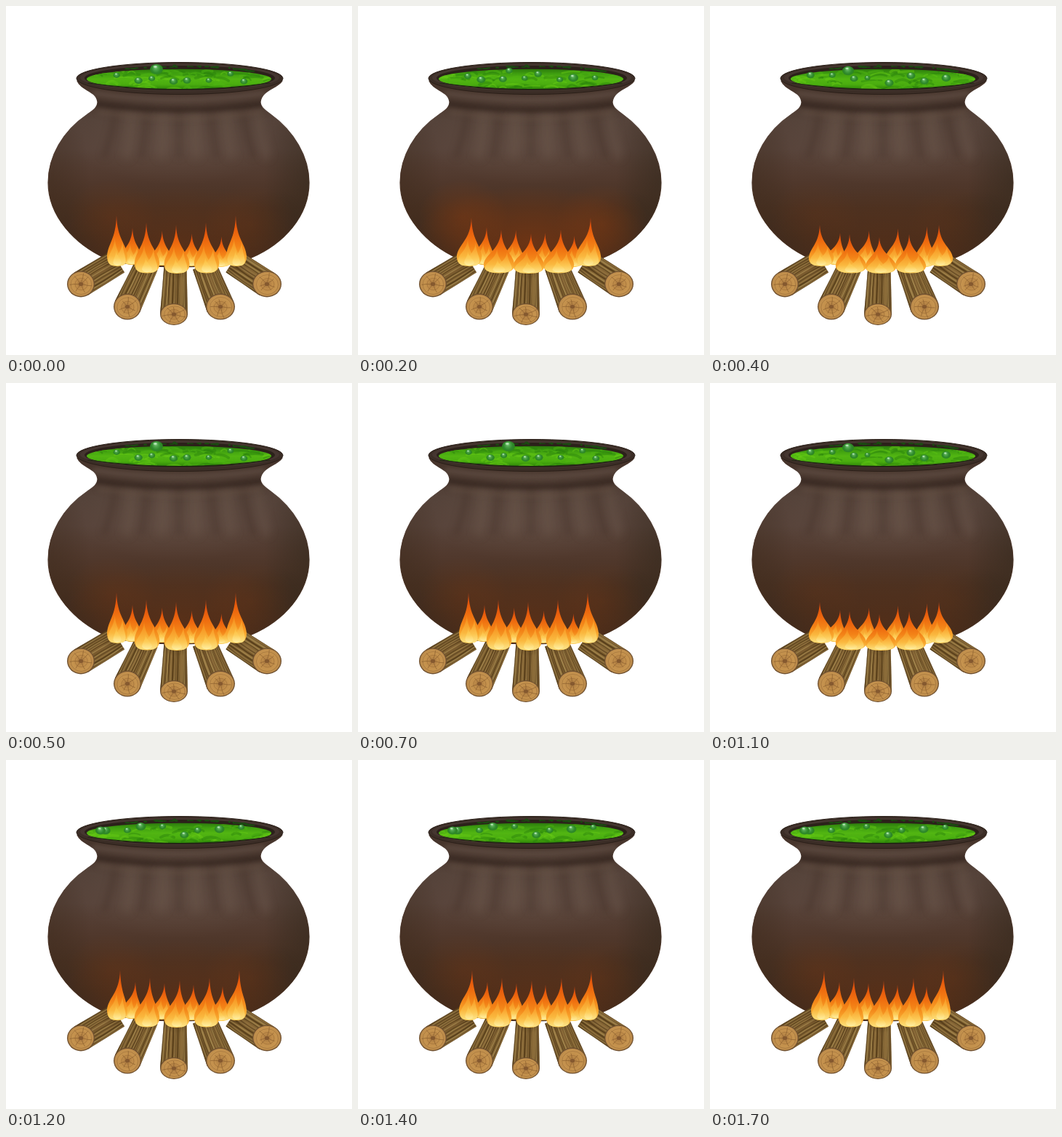
These frames come from a looping animation (476 by 480 pixels, 1.8 s). An HTML page with a canvas:

```html
<!DOCTYPE html>
<html lang="en">
<head>
<meta charset="utf-8">
<title>Cauldron</title>
<style>
html, body { margin: 0; width: 100%; height: 100%; overflow: hidden; background: #fff; }
canvas { display: block; width: 476px; height: 480px; }
</style>
</head>
<body>
<canvas id="stage" width="476" height="480"></canvas>
<script>
const W = 476, H = 480, TICK = 50, TAU = Math.PI * 2;
const stage = document.getElementById('stage').getContext('2d');

// Each pose is followed by the number of ticks it stays
const TIMELINE = 'A1C2D1B2A2C1D1A2B2A2C2D2A2C1D2A1C2D2A2C2D2'
  .replace(/(\w)(\d)/g, (_, pose, n) => pose.repeat(n));

// Front flames: height at the ends, dip in the middle, lean and width.
// Back flames: first height, step, lean. Then pot glow and largest bubble.
const POSES = {
  A: { top: 288, dip: 13, lean: -1, width: 35, backTop: 305, step: 4, backLean: 1, glow: 0.42, bubble: [207, 87, 9] },
  B: { top: 291, dip: 22, lean: 3, width: 43, backTop: 304, step: 4, backLean: 4, glow: 0.85, bubble: [208, 89, 5] },
  C: { top: 301, dip: 17, lean: -2, width: 43, backTop: 312, step: -3, backLean: 6, glow: 0.28, bubble: [190, 89, 8] },
  D: { top: 289, dip: 14, lean: 4, width: 35, backTop: 305, step: 2, backLean: 5, glow: 0.42, bubble: [130, 97, 7] }
};

function seeded(n) {
  return () => {
    n = (n * 16807) % 2147483647;
    return n / 2147483647;
  };
}

function ellipse(c, x, y, rx, ry, fill) {
  c.beginPath();
  c.ellipse(x, y, rx, ry, 0, 0, TAU);
  if (fill) { c.fillStyle = fill; c.fill(); }
}

function shade(gradient, ...colors) {
  colors.forEach((color, i) => gradient.addColorStop(i / (colors.length - 1), color));
  return gradient;
}

// Soft elliptical patch of colour
function patch(c, x, y, rx, ry, rgb, alpha) {
  c.save();
  c.translate(x, y);
  c.scale(rx, ry);
  const g = shade(c.createRadialGradient(0, 0, 0, 0, 0, 1),
    `rgba(${rgb},${alpha})`, `rgba(${rgb},${alpha * 0.55})`, `rgba(${rgb},0)`);
  ellipse(c, 0, 0, 1, 1, g);
  c.restore();
}

function curve(c, color, width, blur, x0, y0, cx, cy, x1, y1) {
  c.save();
  c.filter = blur ? `blur(${blur}px)` : 'none';
  c.strokeStyle = color;
  c.lineWidth = width;
  c.lineCap = 'round';
  c.beginPath();
  c.moveTo(x0, y0);
  c.quadraticCurveTo(cx, cy, x1, y1);
  c.stroke();
  c.restore();
}

function potPath(c) {
  c.beginPath();
  c.moveTo(98, 103);
  c.bezierCurveTo(104, 117, 124, 116, 126, 132);
  c.bezierCurveTo(126, 140, 119, 144, 112, 149);
  c.bezierCurveTo(78, 172, 58, 207, 58, 243);
  c.bezierCurveTo(58, 289, 95, 328, 137, 347);
  c.bezierCurveTo(172, 363, 304, 363, 338, 346);
  c.bezierCurveTo(382, 327, 417, 289, 417, 243);
  c.bezierCurveTo(417, 207, 396, 172, 364, 149);
  c.bezierCurveTo(357, 144, 350, 139, 350, 132);
  c.bezierCurveTo(352, 115, 373, 114, 380, 103);
  c.closePath();
}

function drawPot(c, glow) {
  c.save();
  potPath(c);
  c.fillStyle = c.strokeStyle = shade(c.createLinearGradient(0, 115, 0, 360),
    '#47352c', '#55433a', '#57433a', '#51392d', '#483021', '#432c1d', '#432a1a');
  c.lineWidth = 1.2;
  c.fill();
  c.stroke();
  c.clip();

  patch(c, 237, 185, 145, 60, '112,91,79', 0.36);
  patch(c, 60, 240, 55, 120, '60,42,28', 0.45);
  patch(c, 417, 240, 62, 130, '54,42,30', 0.65);
  patch(c, 115, 325, 80, 46, '58,42,30', 0.5);
  patch(c, 372, 310, 70, 56, '52,40,30', 0.5);

  // Folds fanning out from the neck
  for (let i = -2; i <= 2; i++) {
    const x = 238 + i * 44;
    curve(c, 'rgba(54,38,29,.26)', 9, 5, x, 146, x + i, 170, x + i * 7, 205);
    curve(c, 'rgba(125,105,93,.2)', 13, 6, x + 22, 152, x + 22, 175, x + 24 + i * 4, 205);
  }

  // Lip and shadowed neck
  curve(c, 'rgba(106,87,77,.6)', 6, 3, 122, 120, 238, 137, 354, 120);
  curve(c, 'rgba(43,30,23,.65)', 7, 3, 121, 134, 238, 151, 356, 134);
  curve(c, 'rgba(100,80,68,.45)', 6, 3, 128, 146, 238, 163, 350, 146);

  patch(c, 238, 325, 165, 78, '150,60,12', glow * 0.6);
  patch(c, 145, 290, 62, 52, '145,62,15', glow * 0.4);
  patch(c, 335, 300, 65, 55, '145,62,15', glow * 0.4);
  c.restore();
}

function drawRim(c) {
  ellipse(c, 239, 99.5, 142, 22, '#3b2d26');
  c.strokeStyle = '#2a1f18';
  c.lineWidth = 1;
  c.stroke();
  ellipse(c, 239, 98.5, 137, 18.5, '#453630');
  ellipse(c, 239, 99, 131, 17, '#2b211a');
  const rnd = seeded(71);
  for (let i = 0; i < 45; i++) {
    const a = Math.PI * (1.3 + rnd() * 0.5);
    ellipse(c, 239 + Math.cos(a) * 123, 99 + Math.sin(a) * (15 + rnd() * 2),
      1 + rnd() * 4, 0.6 + rnd(), '#1c4b12');
  }
}

function drawBubble(c, x, y, r) {
  ellipse(c, x, y, r, r * 0.78, shade(c.createRadialGradient(x - r * 0.15, y - r * 0.4, 0, x, y, r),
    '#9bd79b', '#4fa64c', '#2f8a2c', '#2c8220'));
  ellipse(c, x - r * 0.2, y - r * 0.4, r * 0.28, r * 0.14, 'rgba(224,255,225,.6)');
}

function drawBrew(c, bubble, seed) {
  const rnd = seeded(seed * 997);
  c.save();
  ellipse(c, 238, 100.5, 127, 13.8, shade(c.createLinearGradient(0, 86, 0, 115),
    '#2a760c', '#3f9f10', '#52b512', '#4aad0f', '#2c8308'));
  c.clip();
  const tones = ['rgba(105,205,22,.45)', 'rgba(36,122,12,.4)', 'rgba(78,182,18,.5)'];
  for (let i = 0; i < 75; i++) {
    const x = 108 + rnd() * 260, y = 88 + rnd() * 26, w = 4 + rnd() * 10;
    curve(c, tones[i % 3], 1.5 + rnd() * 2.5, 0, x - w, y + 2, x, y - 5 + rnd() * 5, x + w, y + rnd() * 4);
  }
  c.restore();
  curve(c, '#1d2912', 1.2, 0, 113, 106, 238, 123, 363, 106);

  for (let i = 0; i < 8; i++) {
    const x = 135 + ((i * 0.618 + seed * 0.23) % 1) * 205;
    drawBubble(c, x, 90 + rnd() * 16, 4 + rnd() * 3);
  }
  drawBubble(c, ...bubble);
}

// One log of the fan, i from -2 to 2
function drawLog(c, i) {
  const rnd = seeded(i * 311 + 1017), off = Math.abs(i);
  const x = 231 + i * 64, y = 424 - i * i * 10.4, rx = 19 + (i > 0), ry = off ? 18 : 15;
  const bx = 233 + i * 39.5, by = 358 - i * i * 1.6, half = 15.5 + off;
  const len = Math.hypot(bx - x, by - y), px = (y - by) / len, py = (bx - x) / len;
  const reach = 1 / Math.hypot(px / rx, py / ry);
  const at = (side, far) => far
    ? [bx + px * half * side, by + py * half * side]
    : [x + px * reach * side, y + py * reach * side];

  c.save();
  c.beginPath();
  [at(-1, 0), at(-1, 1), at(1, 1), at(1, 0)].forEach(p => c.lineTo(...p));
  c.closePath();
  c.fillStyle = shade(c.createLinearGradient(...at(-1, 0), ...at(1, 0)),
    '#5d4420', '#8b6c39', '#7a5a2e', '#8b6c39', '#5a4120');
  c.fill();
  c.clip();
  const barks = ['rgba(80,56,22,.75)', 'rgba(168,140,82,.7)', 'rgba(98,70,34,.7)', 'rgba(148,118,64,.7)'];
  for (let k = 0; k < 20; k++) {
    const side = -0.95 + k * 0.1, bend = (rnd() - 0.5) * 9;
    const [x0, y0] = at(side, 0), [x1, y1] = at(side, 1);
    curve(c, barks[k % 4], 1 + rnd() * 1.5, 0, x0, y0,
      (x0 + x1) / 2 + px * bend, (y0 + y1) / 2 + py * bend, x1, y1);
  }
  patch(c, bx, by, 25, 18, '60,38,12', 0.35);
  c.restore();

  ellipse(c, x, y, rx, ry, '#6f5030');
  ellipse(c, x, y, rx - 1.3, ry - 1.3, shade(
    c.createRadialGradient(x, y, 1, x, y, rx), '#a87840', '#c08d4a', '#c6944f', '#b58548'));
  c.lineWidth = 0.7;
  c.strokeStyle = 'rgba(125,82,40,.5)';
  for (const k of [0.45, 0.75]) {
    ellipse(c, x + rnd(), y + rnd(), rx * k, ry * k);
    c.stroke();
  }
  for (let k = 0; k < 7; k++) {
    const a = k * TAU / 7 + rnd() * 0.5, far = 0.5 + rnd() * 0.4;
    const ray = (t, turn) => [x + Math.cos(a + turn) * rx * t, y + Math.sin(a + turn) * ry * t];
    curve(c, 'rgba(118,78,38,.65)', 0.8, 0, ...ray(0.2, 0), ...ray(far * 0.7, 0.1), ...ray(far, 0));
  }
  ellipse(c, x, y, 3.2, 2.6, '#85592f');
}

function tongue(c, tx, ty, x, base, w, colors) {
  const h = base - ty, r = w / 2, mid = ty + h * 0.48;
  c.beginPath();
  c.moveTo(tx, ty);
  c.bezierCurveTo(tx + 1, mid, x + r * 0.9, mid + h * 0.06, x + r, base - h * 0.2);
  c.bezierCurveTo(x + r, base - 3, x + r * 0.6, base, x, base);
  c.bezierCurveTo(x - r * 0.6, base, x - r, base - 3, x - r, base - h * 0.2);
  c.bezierCurveTo(x - r * 0.9, mid + h * 0.06, tx - 1, mid, tx, ty);
  c.fillStyle = shade(c.createLinearGradient(0, ty, 0, base), ...colors);
  c.fill();
}

function drawFlame(c, tx, ty, x, base, w) {
  const h = base - ty, lean = tx - x;
  tongue(c, tx, ty, x, base, w, ['#cf4412', '#e4560c', '#ee6c0f', '#f38317', '#f8a52c', '#fccb55']);
  tongue(c, x + lean * 0.5 - w * 0.1, ty + h * 0.42, x - w * 0.14, base - 1, w * 0.62,
    ['rgba(250,150,30,.2)', '#f79d28', '#fab83f', '#fee07a']);
  tongue(c, x + w * 0.26, ty + h * 0.5, x + w * 0.17, base - 1, w * 0.5,
    ['rgba(255,170,46,.2)', '#f9a630', '#fcc651', '#fee489']);
  tongue(c, x - w * 0.05, ty + h * 0.68, x, base - 1, w * 0.4,
    ['rgba(255,200,70,.1)', '#fdcc58', '#fff0a4']);
}

function drawFire(c, p) {
  for (let i = 0; i < 4; i++) {
    const x = 173 + i * 41;
    drawFlame(c, x + p.backLean * (1 - i * 0.2), p.backTop + p.step * i, x, 356 + i, 28);
  }
  for (let i = 0; i < 5; i++) {
    const x = 153 + i * 41, u = i / 2 - 1, end = u ** 4;
    drawFlame(c, x + p.lean, p.top + p.dip * (1 - u * u), x, 368 - 10 * end, p.width * (1 - 0.2 * end));
  }
}

function renderPose(name, index) {
  const canvas = document.createElement('canvas');
  canvas.width = W;
  canvas.height = H;
  const c = canvas.getContext('2d'), pose = POSES[name];
  c.fillStyle = '#fff';
  c.fillRect(0, 0, W, H);
  drawPot(c, pose.glow);
  drawRim(c);
  drawBrew(c, pose.bubble, index + 1);
  for (let i = -2; i <= 2; i++) drawLog(c, i);
  drawFire(c, pose);
  return canvas;
}

const images = {};
Object.keys(POSES).forEach((name, i) => { images[name] = renderPose(name, i); });

const start = performance.now();
function draw(now) {
  const tick = Math.floor(Math.max(0, now - start) / TICK) % TIMELINE.length;
  stage.drawImage(images[TIMELINE[tick]], 0, 0);
  requestAnimationFrame(draw);
}
draw(start);
</script>
</body>
</html>
```
